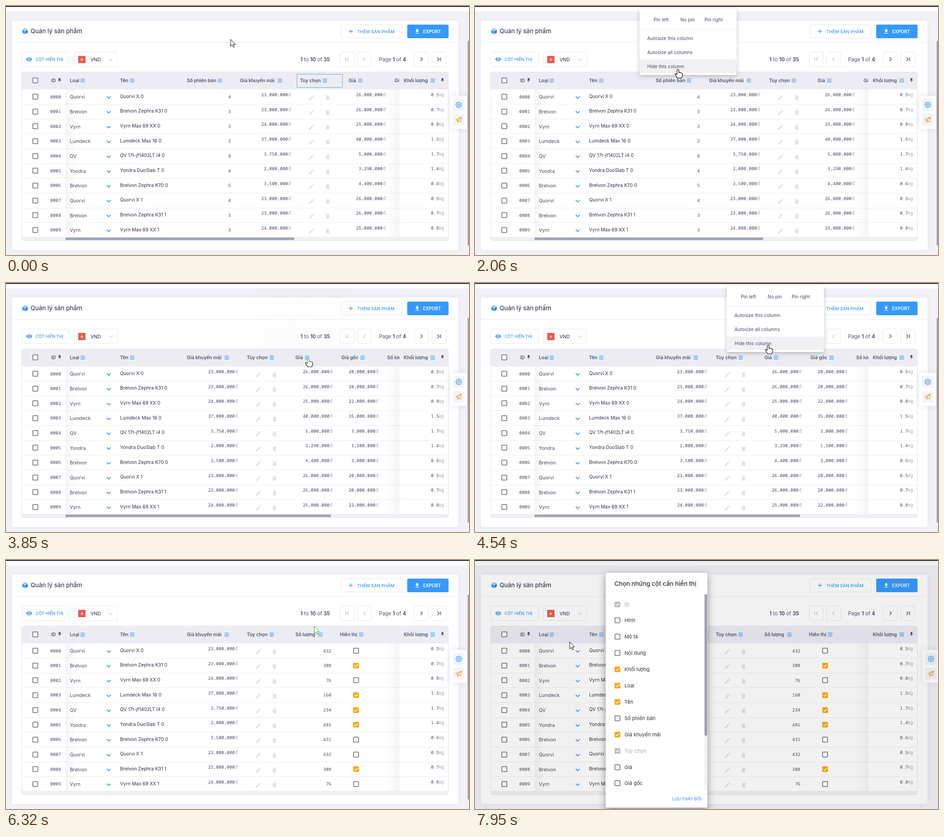
Write an HTML page with a canvas that moves like this. It is 1019x549 px and loops after 8 s.

```html
<!DOCTYPE html>
<html lang="vi">
<head>
<meta charset="utf-8">
<style>
html, body { margin: 0; width: 100%; height: 100%; overflow: hidden; background: #f0f0f6; }
canvas { display: block; }
</style>
</head>
<body>
<canvas id="stage" width="1019" height="549"></canvas>
<script>
const ctx = document.getElementById('stage').getContext('2d');
const LOOP = 8000, HOLD = 300, STEP = 7650 / 99;
const SANS = 'Inter, "Open Sans", sans-serif', MONO = '"Noto Sans Mono", "DejaVu Sans Mono", monospace';
const BLUE = '#3699ff', INK = '#464b5e', HEAD = '#50556f', AMBER = '#ffa50a', MUTED = '#a3a6b4', THUMB = '#a0a3b7';

const ICONS = {
  pencil: 'M3 17.2V21h3.8L17.8 9.9l-3.7-3.7zM20.7 7a1 1 0 0 0 0-1.4l-2.3-2.3a1 1 0 0 0-1.4 0l-1.9 1.8 3.8 3.8z',
  trash: 'M6 19a2 2 0 0 0 2 2h8a2 2 0 0 0 2-2V7H6zM19 4h-3.5l-1-1h-5l-1 1H5v2h14z',
  download: 'M19 9h-4V3H9v6H5l7 7zM5 18v2h14v-2z',
  eye: 'M12 4.5C7 4.5 2.7 7.6 1 12c1.7 4.4 6 7.5 11 7.5s9.3-3.1 11-7.5C21.3 7.6 17 4.5 12 4.5zM12 17a5 5 0 1 1 0-10 5 5 0 0 1 0 10zM12 9a3 3 0 1 0 0 6 3 3 0 0 0 0-6z',
  pin: 'M16 9V4h1V2H7v2h1v5c0 1.7-1.3 3-3 3v2h6v7l1 1 1-1v-7h6v-2c-1.7 0-3-1.3-3-3z',
};
for (const key in ICONS) ICONS[key] = new Path2D(ICONS[key]);
const ARROW = new Path2D('M.5.5V16L4 12.6 6.4 18 8.9 17 6.6 11.7H11.3Z');
const HAND = new Path2D('M-2 1.5Q0-1.5 2 1.5V7Q4 5.5 5 7.6 7 6.4 8 8.5 10 8 10 10.5V14L8 19H-1L-5.5 12Q-7 9.5-4.5 9.3L-2 11Z');

// type, model, versions, sale price, price, cost, stock, weight, visible
const PRODUCTS = [
  ['Quorvi', 'Quorvi X', 4, 23e6, 26e6, 20e6, 432, '0.5', 0],
  ['Brelvon', 'Brelvon Zephra K31', 3, 23e6, 26e6, 20e6, 308, '0.7', 1],
  ['Vyrn', 'Vyrn Max 69 XX', 3, 24e6, 25e6, 22e6, 76, '0.8', 0],
  ['Lumdeck', 'Lumdeck Max 16', 2, 37e6, 40e6, 35e6, 160, '1.5', 1],
  ['QV', 'QV 17t-jf1402LT i4', 8, 3.75e6, 5e6, 3e6, 234, '1.7', 1],
  ['Yondra', 'Yondra DuoSlab T', 4, 2e6, 3.29e6, 1.5e6, 485, '1.4', 1],
  ['Brelvon', 'Brelvon Zephra K70', 5, 3.5e6, 4.4e6, 3e6, 431, '0.6', 0],
];
const ROWS = Array.from({ length: 10 }, (_, i) => {
  const [type, model, ...rest] = PRODUCTS[i % 7];
  return [type, `${model} ${Math.floor(i / 7)}`, ...rest];
});
const rowY = i => 200 + 32.65 * i;
const number = field => (row, x, y, right) => text(row[field], x + right, y + 3.5, 9.8, INK, { font: MONO, align: 'right' });
const money = field => (row, x, y, right) => {
  text(row[field].toLocaleString('en-US'), x + right - 6.5, y - 1, 9.8, INK, { font: MONO, align: 'right' });
  text('đ', x + right, y - 1, 9.8, MUTED, { align: 'right' });
};
const COLUMNS = [
  { title: 'Số phiên bản', width: 117, icon: 68, right: 104, cell: number(2), hideAt: 2310 },
  { title: 'Giá khuyến mãi', width: 132, icon: 83, right: 119, cell: money(3) },
  { title: 'Tùy chọn', width: 107, icon: 50, focusUntil: 1370, cell(row, x, y) {
    icon('pencil', x + 32.5, y + 2, 15, '#e1e2e9');
    icon('trash', x + 68, y + 2, 14, '#e1e2e9');
  } },
  { title: 'Giá', width: 101, icon: 21, right: 88.5, cell: money(4), hideAt: 4640 },
  { title: 'Giá gốc', width: 101, icon: 42, right: 88.5, cell: money(5), hideAt: 6250 },
  { title: 'Số lượng', width: 98, icon: 50, right: 86, cell: number(6) },
  { title: 'Hiển thị', width: 130, icon: 42, cell: (row, x, y) => checkbox(x + 42.5, y, row[8] && AMBER) },
];
const MENUS = [[1370, 2310, 362], [3850, 4640, 554], [5470, 6250, 575]];
const CLICKS = [1220, 2230, 3700, 4560, 5320, 6170, 7320];
const HAND_TIMES = [[930, 1500], [1850, 2310], [3550, 4000], [4200, 4640], [5050, 5560], [5850, 6250], [7150, 7450]];
const PATH = [
  [300, 494, 73], [1000, 476, 162], [1470, 476, 162], [1900, 448, 146], [2060, 446, 137], [2560, 446, 137],
  [3000, 590, 150], [3600, 665, 166], [3950, 665, 166], [4300, 645, 137], [4700, 645, 137], [5100, 684, 162],
  [5480, 684, 162], [6000, 678, 146], [6480, 678, 146], [7200, 78, 115], [7420, 78, 115], [7900, 208, 180],
];
const OPTIONS = ['-ID', 'Hình', 'Mô tả', 'Nội dung', '+Khối lượng', '+Loại', '+Tên', 'Số phiên bản',
  '+Giá khuyến mãi', '-Tùy chọn', 'Giá', 'Giá gốc'];

const clamp = v => Math.max(0, Math.min(1, v));
const ease = v => v * v * (3 - 2 * v);
const during = (t, [from, to]) => t >= from && t < to;

function text(value, x, y, size, color, { weight = 400, font = SANS, align = 'left' } = {}) {
  ctx.font = `${weight} ${size}px ${font}`;
  ctx.textAlign = align;
  ctx.fillStyle = color;
  ctx.fillText(value, x, y);
}
function rect(x, y, w, h, fill, radius = 0, border, width = 1) {
  ctx.beginPath();
  ctx.roundRect(x, y, w, h, radius);
  if (fill) { ctx.fillStyle = fill; ctx.fill(); }
  if (border) { ctx.strokeStyle = border; ctx.lineWidth = width; ctx.stroke(); }
}
const outline = (x, y, w, h) => rect(x + .5, y + .5, w - 1, h - 1, '#fff', 3, '#e6e8f0');
function stroke(path, x, y, color, width = 1.5) {
  ctx.save();
  ctx.translate(x, y);
  ctx.strokeStyle = color;
  ctx.lineWidth = width;
  ctx.lineJoin = 'round';
  ctx.stroke(new Path2D(path));
  ctx.restore();
}
function icon(name, x, y, size, color) {
  ctx.save();
  ctx.translate(x - size / 2, y - size / 2);
  ctx.scale(size / 24, size / 24);
  ctx.fillStyle = color;
  ctx.fill(ICONS[name], 'evenodd');
  ctx.restore();
}
function shadowed(color, blur, offset, draw) {
  ctx.save();
  ctx.shadowColor = color;
  ctx.shadowBlur = blur;
  ctx.shadowOffsetY = offset;
  draw();
  ctx.restore();
}
function checkbox(x, y, fill) {
  rect(x - 5.5, Math.round(y) - 5.5, 11, 11, fill || '#fff', 1, fill || '#666973', 1.5);
  if (fill) stroke('M-3.7 0-1.2 2.6 3.9-2.6', x, Math.round(y), '#fff', 1.5);
}
const menuIcon = x => [160.5, 163.8, 167].forEach(y => rect(x, y, 9.5, 1.3, BLUE));
function header(title, x, iconX) {
  text(title, x, 167.5, 10.3, HEAD, { weight: 600 });
  if (iconX) menuIcon(iconX);
}
function poly(points, color) {
  ctx.fillStyle = color;
  ctx.beginPath();
  points.forEach(([x, y]) => ctx.lineTo(x, y));
  ctx.fill();
}
function radial(x, y, count, radius) {
  return Array.from({ length: count }, (_, i) => {
    const a = i * 2 * Math.PI / count - Math.PI / 2;
    return [x + Math.cos(a) * radius(i), y + Math.sin(a) * radius(i)];
  });
}
function mixedText(parts, x, y) {
  parts.forEach((part, i) => {
    text(part, x, y, 11.2, '#50577a', { weight: i % 2 ? 400 : 700 });
    x += ctx.measureText(part).width;
  });
}

function drawPage() {
  rect(0, 0, 1019, 549, '#f1f1f7');
  rect(0, 0, 1019, 12, '#fff');
  rect(0, 0, 1019, 2, '#24242a');
  shadowed('rgba(80,80,120,.07)', 10, 0, () => rect(13, 32, 983, 506, '#fff', 4));
  rect(13, 80, 983, 1, '#ebedf3');
  poly([[42, 49], [48, 51.5], [42, 54], [36, 51.5]], '#8cc6ff');
  poly([[36, 52.5], [41.6, 55], [41.6, 62], [36, 59]], BLUE);
  poly([[48, 52.5], [42.4, 55], [42.4, 62], [48, 59]], '#2b86e8');
  text('Quản lý sản phẩm', 54, 59.5, 13.3, '#3f4254', { weight: 500 });

  outline(737, 41, 135, 30);
  stroke('M-4.5 0H4.5M0-4.5V4.5', 759, 56, BLUE, 1.3);
  text('THÊM SẢN PHẨM', 773, 59.5, 9.6, BLUE, { weight: 500 });
  rect(883, 41, 91, 30, BLUE, 3);
  icon('download', 905, 56, 14, '#fff');
  text('EXPORT', 918, 59.5, 9.7, '#fff', { weight: 600 });

  outline(34, 101, 106, 33);
  icon('eye', 51, 117.5, 14, BLUE);
  text('CỘT HIỂN THỊ', 65, 121, 9.1, BLUE, { weight: 500 });
  outline(150, 101, 96, 33);
  rect(159, 110, 16, 16, '#ee5a4f');
  poly(radial(167, 118.3, 10, i => i % 2 ? 1.7 : 4), '#ffcf9a');
  text('VND', 186, 121.5, 10.4, INK, { weight: 500 });
  stroke('M-4.5-2.2 0 2.5 4.5-2.2', 230.5, 118, '#cfd1da', 1.2);

  mixedText(['1', ' to ', '10', ' of ', '35'], 648, 121.5);
  mixedText(['', 'Page ', '1', ' of ', '4'], 821, 121.5);
  [735, 773, 898, 937].forEach(x => outline(x, 101, 32, 33));
  stroke('M-3.5-4V4M3.5-4-.5 0 3.5 4', 751, 117.5, '#c0c3cd', 1.2);
  stroke('M2-4-2 0 2 4', 789, 117.5, '#c0c3cd', 1.2);
  stroke('M-2-4 2 0-2 4', 914.5, 117.5, HEAD);
  stroke('M-3.5-4 .5 0-3.5 4M3.5-4V4', 953, 117.5, HEAD);
}

function drawTable(t) {
  rect(34.5, 145.5, 939, 372, '#fff', 4, '#e4e6ec');
  rect(35, 146, 938, 37, '#ebedf2');
  rect(35, 509, 938, 8, '#eff0f4');
  ROWS.forEach((_, i) => rect(35, Math.round(rowY(i) - 16.7), 938, 1, '#eceef3'));

  ctx.save();
  ctx.beginPath();
  ctx.rect(131, 146, 735, 363);
  ctx.clip();
  header('Loại', 140.5, 164);
  header('Tên', 251, 273);
  ROWS.forEach((row, i) => {
    const y = rowY(i);
    text(row[0], 140.5, y + 4.3, 10.5, INK);
    stroke('M-4.2-2 0 2.2 4.2-2', 226, y + 1.3, BLUE, 1.8);
    text(row[1], 251, y + 2.7, 10.3, '#2f3242');
  });
  let x = 391;
  for (const col of COLUMNS) {
    if (t >= col.hideAt) continue;
    header(col.title, x + 7, x + 7 + col.icon);
    if (t < col.focusUntil) rect(x + .5, 150.5, 100, 29, null, 0, '#6fa5e6');
    ROWS.forEach((row, i) => col.cell(row, x, rowY(i), col.right));
    x += col.width;
  }
  ctx.restore();

  // Shadows beside the pinned columns
  const fade = (from, to) => {
    const gradient = ctx.createLinearGradient(from, 0, to, 0);
    gradient.addColorStop(0, 'rgba(60,60,90,.05)');
    gradient.addColorStop(1, 'rgba(60,60,90,0)');
    rect(Math.min(from, to), 183, Math.abs(to - from), 326, gradient);
  };
  fade(131, 155);
  fade(866, 838);
  rect(866, 146, 107, 37, '#ebedf2');
  rect(866, 509, 1, 8, '#e4e6ec');
  rect(131, 509, 1, 8, '#e4e6ec');

  checkbox(64.5, 164);
  header('ID', 99.5);
  icon('pin', 118, 163.5, 11, HEAD);
  header('Khối lượng', 875.5, 934.5);
  icon('pin', 960.5, 163.5, 11, HEAD);
  ROWS.forEach((row, i) => {
    const y = rowY(i);
    checkbox(64.5, y);
    text('000' + i, 97.5, y + 3.5, 9.8, INK, { font: MONO });
    text(row[7], 953, y - 1, 9.8, INK, { font: MONO, align: 'right' });
    text('kg', 964, y - 1, 9.6, MUTED, { align: 'right' });
  });
  const thumbEnd = t < 2310 ? 634 : t < 4640 ? 715 : t < 6250 ? 806 : 0;
  if (thumbEnd) rect(131, 510.5, thumbEnd - 131, 5.5, THUMB);
}

function drawSidePanel(locked) {
  if (!locked) rect(1016, 77, 3, 451, THUMB);
  const x = locked ? 985 : 978;
  shadowed('rgba(60,60,100,.14)', 14, 0, () => rect(x, 198, 37, 73, '#fff', 4));
  rect(x + 6, 205, 25, 26, '#f3f4f8', 3);
  rect(x + 6, 238, 25, 25, '#f3f4f8', 3);
  ctx.beginPath();
  radial(x + 18.5, 218, 32, i => i % 4 < 2 ? 6.5 : 5).forEach(p => ctx.lineTo(...p));
  ctx.closePath();
  ctx.strokeStyle = BLUE;
  ctx.lineWidth = 1.2;
  ctx.stroke();
  ctx.beginPath();
  ctx.arc(x + 18.5, 218, 2.2, 0, 7);
  ctx.stroke();
  stroke('M6-6-6.5 0-2.5 2 4 5.5ZM6-6-2.5 2V6L0 3.4', x + 18.5, 250.5, '#f39a2b', 1.2);
}

function drawMenu(x, opacity, hover) {
  ctx.save();
  ctx.globalAlpha = opacity;
  shadowed('rgba(0,0,0,.22)', 10, 3, () => rect(x, 6, 214, 146, '#fff', 4));
  if (hover) rect(x, 118, 214, 30, '#f1f1f4');
  ['Pin left', 'No pin', 'Pin right'].forEach((label, i) => text(label, x + [31, 90, 143][i], 34, 10.3, INK));
  rect(x, 51, 214, 1, '#ebedf3');
  ['Autosize this column', 'Autosize all columns', 'Hide this column']
    .forEach((label, i) => text(label, x + 17, 75 + 31 * i, 10.3, INK));
  ctx.restore();
}

function drawDialog(opacity) {
  ctx.save();
  ctx.globalAlpha = opacity;
  ctx.translate(400, 287);
  ctx.scale(.9 + .1 * opacity, .9 + .1 * opacity);
  ctx.translate(-400, -287);
  shadowed('rgba(0,0,0,.42)', 16, 5, () => rect(287.5, 28, 224, 518, '#fff', 3));
  text('Chọn những cột cần hiển thị', 307, 56.5, 13.4, '#2b2d3a', { weight: 500 });
  OPTIONS.forEach((option, i) => {
    const y = 97.5 + 35.9 * i, disabled = option[0] === '-', checked = option[0] === '+';
    checkbox(313.5, y, disabled ? '#bcbcbf' : checked && AMBER);
    text(option.replace(/^[+-]/, ''), 329, y + 4, 11, disabled ? '#a9a9af' : '#30323e');
  });
  rect(505, 76, 6, 431, '#f3f3f7');
  rect(505, 76, 6, 311, THUMB);
  text('LƯU THAY ĐỔI', 498.5, 530, 9.1, BLUE, { weight: 500, align: 'right' });
  ctx.restore();
}

function cursorAt(t) {
  const next = PATH.findIndex(key => key[0] > t);
  if (next <= 0) return (next ? PATH.at(-1) : PATH[0]).slice(1);
  const [t0, x0, y0] = PATH[next - 1], [t1, x1, y1] = PATH[next];
  const k = ease((t - t0) / (t1 - t0));
  return [x0 + (x1 - x0) * k, y0 + (y1 - y0) * k];
}
function drawCursor(t) {
  const isHand = HAND_TIMES.some(span => during(t, span));
  const shape = isHand ? HAND : ARROW;
  ctx.save();
  ctx.translate(...cursorAt(t));
  if (CLICKS.some(c => during(t, [c, c + 150]))) {
    ctx.fillStyle = 'rgba(250,240,20,.72)';
    ctx.beginPath();
    ctx.arc(0, 0, 10, 0, 7);
    ctx.fill();
  }
  const ink = ctx.createRadialGradient(0, 0, 6, 0, 0, 15);
  ink.addColorStop(0, '#2f9e3f');
  ink.addColorStop(1, isHand ? '#111' : '#2f9e3f');
  ctx.fillStyle = '#fff';
  ctx.fill(shape);
  ctx.strokeStyle = CLICKS.some(c => during(t, [c + 150, c + 300])) ? ink : '#111';
  ctx.lineWidth = isHand ? 1.2 : 1;
  ctx.stroke(shape);
  ctx.restore();
}

function draw(t) {
  drawPage();
  drawTable(t);
  drawSidePanel(t >= 7550);
  for (const [from, to, x] of MENUS) {
    if (during(t, [from, to])) drawMenu(x, clamp((t - from) / 160), t > from + 400);
  }
  if (t >= 7550) {
    rect(0, 2, 1019, 547, `rgba(0,0,0,${.055 * clamp((t - 7550) / 390)})`);
    drawDialog(ease(clamp((t - 7550) / 250)));
  }
  drawCursor(t);
}
function frame() {
  const t = performance.now() % LOOP;
  draw(t < HOLD ? 0 : HOLD + Math.floor((t - HOLD) / STEP + .1) * STEP);
  requestAnimationFrame(frame);
}
frame();
</script>
</body>
</html>
```
